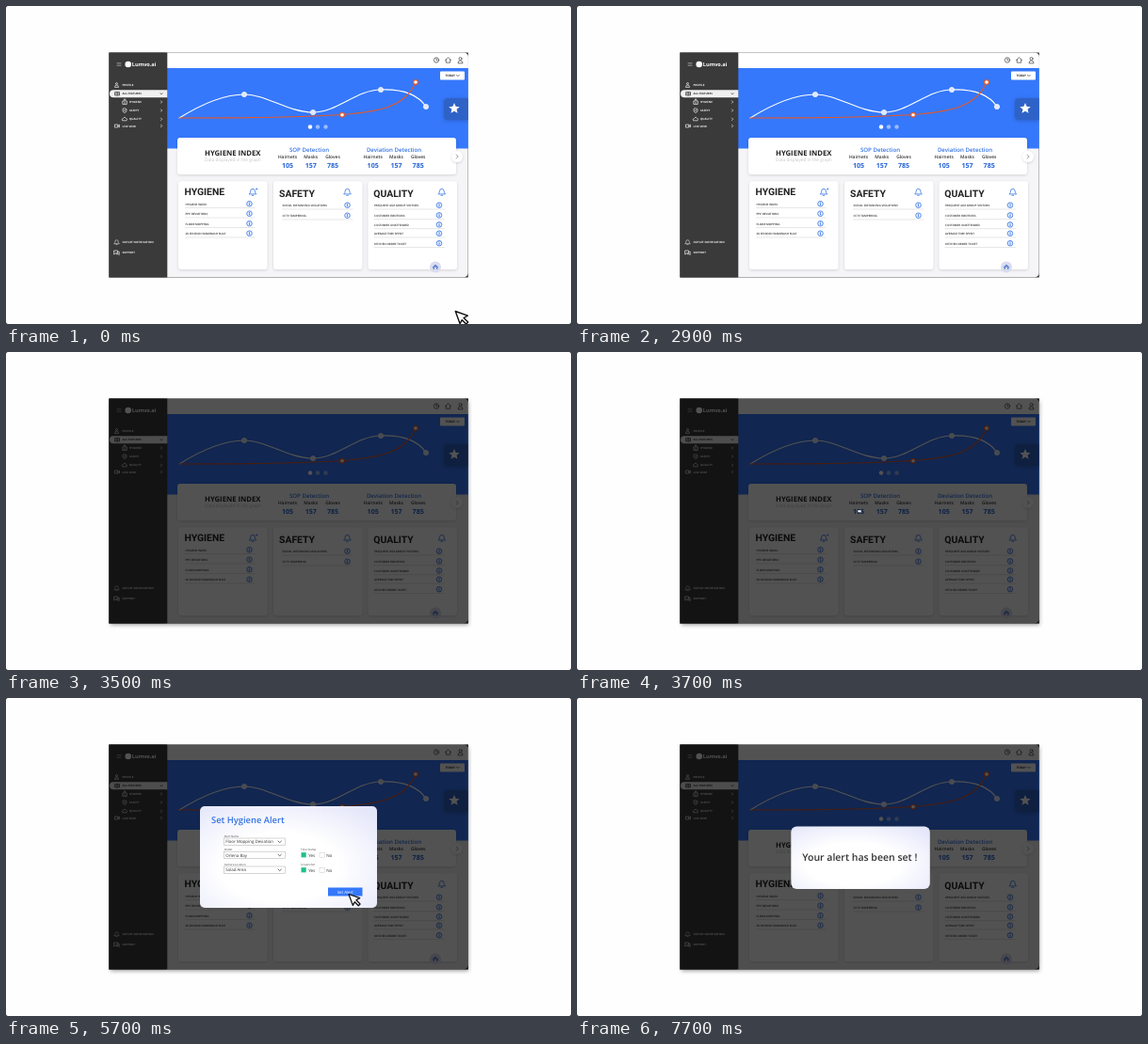
An HTML page that plays this animation: 600 by 338 pixels, repeating every 8000 ms.

```html
<!DOCTYPE html>
<html lang="en">
<head>
<meta charset="utf-8">
<title>Hygiene alert</title>
<style>
html, body { margin: 0; width: 100%; height: 100%; overflow: hidden; background: #000; }
svg { display: block; width: 100vw; height: 100vh; font-family: "Open Sans", sans-serif; text-rendering: geometricPrecision; }
.semi { font-weight: 600; }
.bold { font-weight: 700; }
.mid { text-anchor: middle; }
.title { font: 700 10.4px Roboto, sans-serif; fill: #222; }
.card { fill: #fff; filter: drop-shadow(0 1px 1.5px #0002); }
.line { fill: none; stroke-linecap: round; stroke-linejoin: round; }
</style>
</head>
<body>
<svg viewBox="0 0 600 338">
  <defs>
    <radialGradient id="glow" cx=".45" cy=".6" r=".75">
      <stop offset=".45" stop-color="#fff"/>
      <stop offset="1" stop-color="#e4e6fa"/>
    </radialGradient>
    <clipPath id="frame"><rect x="109.4" y="49.5" width="381.4" height="239"/></clipPath>
  </defs>
  <rect width="600" height="338" rx="2" fill="#fefefe"/>
  <rect id="shadow" x="110" y="50" width="380" height="238" style="filter:drop-shadow(1.5px 2px 2px #0006)"/>

  <g clip-path="url(#frame)">
    <rect x="109" y="49" width="383" height="240" fill="#333"/>
    <rect x="165" y="49.5" width="325.8" height="239" rx="5" fill="#f5f5f8"/>
    <path d="M171 49.5H486a5 5 0 0 1 5 5V66H171Z" fill="#fff"/>
    <rect x="171" y="66" width="320" height="85.5" fill="#3578fb"/>
    <rect x="109" y="49" width="62.3" height="240" fill="#3a3a3a"/>

    <g class="line" stroke="#555" stroke-width=".8">
      <circle cx="457" cy="57.5" r="2.7"/><path d="M457 56v1.7h1.2"/>
      <path d="M466.5 57.5l3-2.7 3 2.7M467.3 57.2v3h4.4v-3"/>
      <circle cx="482.5" cy="56" r="1.5"/><path d="M480 60.5q0-2.5 2.5-2.5t2.5 2.5z"/>
    </g>

    <g class="line" stroke="#fff" stroke-width="1.1">
      <path d="M184 119C205 106 230 94 253 94S300 113 326 113 372 89 398 89C424 88 438 95 446 107"/>
      <path d="M184 119C260 119 320 118 357 115.5 398 112 424 107 435 81" stroke="#e4572a"/>
    </g>
    <g id="markers"></g>

    <rect x="461" y="69.5" width="26" height="9" rx="1" fill="#fff"/>
    <text class="bold" x="466.5" y="75.2" font-size="3.2" fill="#333">TODAY</text>
    <path class="line" d="M478.5 73.3l1.4 1.4 1.4-1.4" stroke="#333" stroke-width=".7"/>
    <rect x="465" y="98" width="28" height="23" rx="4" fill="#2f62c6" style="filter:drop-shadow(0 1px 2px #0003)"/>
    <path id="star" fill="#fff"/>

    <g id="sidebar"></g>

    <rect class="card" x="182" y="140" width="296" height="39" rx="3"/>
    <text class="bold" x="211" y="159" font-size="7.7" fill="#222">HYGIENE INDEX</text>
    <text x="211" y="165.3" font-size="4.7" fill="#c4c4c4">Data displayed in the graph</text>
    <g id="stats"></g>
    <circle class="card" cx="479" cy="160" r="6"/>
    <path class="line" d="M478.2 158l2 2-2 2" stroke="#888" stroke-width=".8"/>

    <g id="cards"></g>

    <circle cx="456" cy="277.5" r="6" fill="#d9dcee"/>
    <path class="line" d="M453.5 277.5l2.5-2.2 2.5 2.2M454.2 279.5v-1.4l1.8-1.4 1.8 1.4v1.4" stroke="#3465c8"/>
  </g>

  <rect id="dim" x="109.4" y="49.5" width="381.4" height="239"/>

  <g id="modal">
    <rect x="206" y="115" width="188" height="108" rx="5" fill="url(#glow)"/>
    <text class="semi" x="218" y="132.7" font-size="9.4" fill="#3373e4">Set Hygiene Alert</text>
    <g id="form"></g>
  </g>
  <g id="submit">
    <rect id="button" x="342" y="201.5" width="36.5" height="9"/>
    <text class="mid" x="360.3" y="207.7" font-size="4.4" fill="#fff">Set Alert</text>
  </g>
  <path id="rays" class="line" stroke="#a9d4ff" stroke-width="1.2"/>

  <g id="popup">
    <rect x="227.3" y="136.5" width="147.5" height="66.5" rx="6" fill="url(#glow)"/>
    <text class="semi mid" x="300.3" y="173.3" font-size="10.5" fill="#333">Your alert has been set !</text>
  </g>

  <path id="cursor" d="M0 0L13 4.6 8.8 7 13.4 11.6 11.4 13.6 7 9.2 4.8 13.2Z" fill="#fff" stroke="#111" stroke-width="1.4" stroke-linejoin="round"/>
</svg>
<script>
const $ = id => document.getElementById(id);
const BLUE = '#2463d6';
const text = (x, y, size, fill, str, cls = 'semi') =>
  `<text class="${cls}" x="${x}" y="${y}" font-size="${size}" fill="${fill}">${str}</text>`;
const stroke = (d, color, width = .7) =>
  `<path class="line" d="${d}" stroke="${color}" stroke-width="${width}"/>`;
const dot = (x, y, r, attrs) => `<circle cx="${x}" cy="${y}" r="${r}" ${attrs}/>`;
const bell = (x, y, k, color) =>
  `<g transform="translate(${x} ${y}) scale(${k})">${stroke('M-3.5 2Q-2.3 1-2.3-1a2.3 2.3 0 0 1 4.6 0Q2.3 1 3.5 2ZM-.8 3.6h1.6', color, .8)}</g>`;
const polar = (x, y, r, a) => `${x + r * Math.cos(a)} ${y + r * Math.sin(a)}`;

$('markers').innerHTML =
  [[253, 94], [326, 113], [398, 89], [446, 107]].map(([x, y]) =>
    dot(x, y, 2.6, 'fill="#dfe7fb" stroke="#fff" stroke-width=".7"')).join('') +
  [[357, 115.7], [435, 81]].map(([x, y]) =>
    dot(x, y, 2.4, 'fill="#fff" stroke="#e4572a" stroke-width="1.2"')).join('') +
  [323, 331, 339.5].map((x, i) =>
    dot(x, 128.5, 2.2, `fill="#fff" opacity="${i ? .5 : 1}"`)).join('');

$('star').setAttribute('d', 'M' + Array.from({length: 10}, (_, i) =>
  polar(476, 109, i % 2 ? 2.7 : 6, (i / 5 - .5) * Math.PI)).join('L') + 'Z');

const menu = [['PROFILE', 123.5, 84], ['ALL FEATURES', 123.5, 93.3], ['HYGIENE', 131, 102],
  ['SAFETY', 131, 111], ['QUALITY', 131, 120.3], ['LIVE VIEW', 123.5, 127.5],
  ['OUTLET NOTIFICATION', 123.5, 251], ['SUPPORT', 123.5, 262]];
const icons = {
  'PROFILE': 'M115.5 86q0-2 2-2t2 2zM116.5 82.5a1 1 0 1 1 2 0 1 1 0 1 1-2 0',
  'ALL FEATURES': 'M116 91.5h4.5v3.5h-4.5zM118.2 91.5v3.5M116 93.2h4.5',
  'HYGIENE': 'M123.8 104v-3h1.5v-2h1.5v2h1.5v3zM126 102v2',
  'SAFETY': 'M126 108.8l2 .8v1.5q0 1.8-2 2.4-2-.6-2-2.4v-1.5zM125.2 111h1.6',
  'QUALITY': 'M124 121.8h4l.6-1.5-1.3-1.3-1.3-1-1.2 1.2-1.4 1z',
  'LIVE VIEW': 'M115.8 126h3v3h-3zM118.8 127.2l1.7-1v2.6l-1.7-1',
  'SUPPORT': 'M115 260h3.5v2.8h-2.2l-1.3 1zM119 261.2h1.2v3.3l-1-.8h-2'
};
$('sidebar').innerHTML =
  stroke('M118 60.5h4M118 62h4M118 63.5h4', '#bbb', .5) +
  dot(129.7, 62, 3.3, 'fill="#fff"') +
  text(133.8, 64.2, 5.6, '#fff', 'Lumvo.ai', 'bold') +
  '<path d="M171.3 89.3H114a3.95 3.95 0 0 0 0 7.9H171.3Z" fill="#f0f0f0"/>' +
  menu.map(([label, x, y], i) => {
    const color = i == 1 ? '#333' : '#eee';
    return text(x, y + 1.1, 2.95, color, label, 'bold') +
      (icons[label] ? stroke(icons[label], color) : bell(117.5, y, .7, color)) +
      (i == 1 ? stroke(`M163.8 ${y - .6}l1.2 1.2 1.2-1.2`, color)
        : i > 1 && i < 6 ? stroke(`M164.5 ${y - 1.2}l1.2 1.2-1.2 1.2`, color) : '');
  }).join('');

$('stats').innerHTML = [['SOP Detection', 322, 299], ['Deviation Detection', 412, 389.7]].map(([head, cx, x]) =>
  text(cx, 155.2, 6.1, '#3373e4', head, 'semi mid') +
  [['Hairnets', 105], ['Masks', 157], ['Gloves', 785]].map(([label, n], i) => {
    const column = x + [0, 24.8, 48][i];
    return text(column, 161.8, 4.9, '#333', label, 'semi mid') +
      text(column, 172, 7.1, BLUE, n, 'bold mid');
  }).join('')).join('');

const cards = [
  {x: 183, title: [189.5, 201], rowX: 190.5, icon: 258.5, ys: [210.5, 221, 231.5, 242],
    rows: ['HYGIENE INDEX', 'PPE DEVIATIONS', 'FLOOR MOPPING', '20 SECOND HANDWASH RULE'], name: 'HYGIENE', bell: 262},
  {x: 284, title: [290, 203], rowX: 293.5, icon: 362.5, ys: [212, 223],
    rows: ['SOCIAL DISTANCING VIOLATIONS', 'CCTV TAMPERING'], name: 'SAFETY', bell: 362.5},
  {x: 384.5, title: [390.3, 203], rowX: 391, icon: 460, ys: [212, 222.7, 232.7, 242, 252.5],
    rows: ['FREQUENT AGE GROUP VISITORS', 'CUSTOMER EMOTIONS', 'CUSTOMER UNATTENDED', 'AVERAGE TIME SPENT', 'KITCHEN ORDER TICKET'], name: 'QUALITY', bell: 462.8}
];
$('cards').innerHTML = cards.map(c =>
  `<rect class="card" x="${c.x}" y="186.3" width="94.5" height="93.7" rx="3"/>` +
  `<text class="title" x="${c.title[0]}" y="${c.title[1]}">${c.name}</text>` +
  bell(c.bell, 197.7, 1, '#3373e4') +
  c.rows.map((row, i) => {
    const y = c.ys[i];
    return text(c.rowX, y + 1.4, 3, '#333', row) +
      stroke(`M${c.rowX} ${y + 4}H${c.icon + 5.5}`, '#ccc', .5) +
      dot(c.icon, y - .3, 2.8, 'fill="#e8f0ff" stroke="#3373e4" stroke-width=".8"') +
      stroke(`M${c.icon} ${y - .4}v1.3m0-2.6v.1`, BLUE, .8);
  }).join('')).join('') + stroke('M265.3 194.5h1.8m-.9-.9v1.8', '#3373e4', .6);

$('form').innerHTML =
  [['Alert Name', 'Floor Mopping Deviation', 149], ['Outlet', 'Orlena Bay', 163.2], ['Camera Location', 'Salad Area', 179]].map(([label, value, y]) =>
    text(231.7, y - 1, 2.95, '#444', label, '') +
    `<rect x="231.3" y="${y}" width="65.4" height="7.4" fill="#fff" stroke="#aaa" stroke-width=".5"/>` +
    text(233.2, y + 5.3, 4.45, '#333', value, '') +
    stroke(`M289 ${y + 3}l1.7 1.7 1.7-1.7`, '#333')).join('') +
  [['Time Stamp', 164.2], ['Screenshot', 180.2]].map(([label, y]) =>
    text(313, y - 2, 2.95, '#444', label, '') +
    `<rect x="313.5" y="${y}" width="5.2" height="5.2" fill="#1fc08a"/>` +
    `<rect x="333" y="${y}" width="5.2" height="5.2" fill="#fff" stroke="#bbb" stroke-width=".4"/>` +
    text(321.2, y + 4.5, 4.5, '#333', 'Yes', '') + text(340.2, y + 4.5, 4.5, '#333', 'No', '')).join('');

const ramp = (t, from, to) => Math.min(1, Math.max(0, (t - from) / (to - from)));
const smooth = p => p * p * (3 - 2 * p);
const lerp = (a, b, p) => a + (b - a) * p;
const scaleAt = (id, s) => $(id).setAttribute('transform', `translate(300 169.3) scale(${s}) translate(-300 -169.3)`);
const fade = (id, opacity) => $(id).setAttribute('opacity', opacity);

function render(t) {
  const dark = ramp(t, 3100, 3500);
  fade('dim', .68 * dark);
  fade('shadow', dark);

  const grow = smooth(ramp(t, 3645, 4330));
  scaleAt('modal', grow);
  scaleAt('submit', grow);
  fade('modal', 1 - ramp(t, 6600, 7110));
  const leave = 1 - ramp(t, 6700, 7230);
  fade('submit', leave);
  $('button').setAttribute('fill', t < 6700 ? '#3578fb' : '#17b183');
  scaleAt('popup', smooth(ramp(t, 7080, 7700)));

  // Click burst beside the pointer tip
  const burst = ramp(t, 5900, 6400);
  $('rays').setAttribute('d', Array.from({length: 10}, (_, i) => {
    const a = i * Math.PI / 5;
    return `M${polar(361, 204.5, lerp(2, 5, burst), a)}L${polar(361, 204.5, lerp(2, 9, burst), a)}`;
  }).join(''));
  fade('rays', burst ? 1 - ramp(t, 6850, 7250) : 0);

  const first = t < 3200;
  const p = smooth(first ? ramp(t, 0, 1900) : ramp(t, 4200, 5700));
  const [x, y] = first ? [lerp(477.3, 262.5, p), lerp(324.5, 198, p)] : [lerp(477, 364, p), lerp(300, 208.5, p)];
  const press = Math.sin(Math.PI * (first ? ramp(t, 1900, 2200) : ramp(t, 5900, 6200)));
  $('cursor').setAttribute('transform', `translate(${x} ${y}) scale(${(first ? 1 : .9) * (1 - .15 * press)})`);
  fade('cursor', first ? 1 - ramp(t, 2300, 2900) : t < 4200 ? 0 : leave);
}

// The picture advances in tenths of a second
function tick() {
  render(Math.floor(performance.now() % 8000 / 100) * 100);
  requestAnimationFrame(tick);
}
tick();
</script>
</body>
</html>
```
